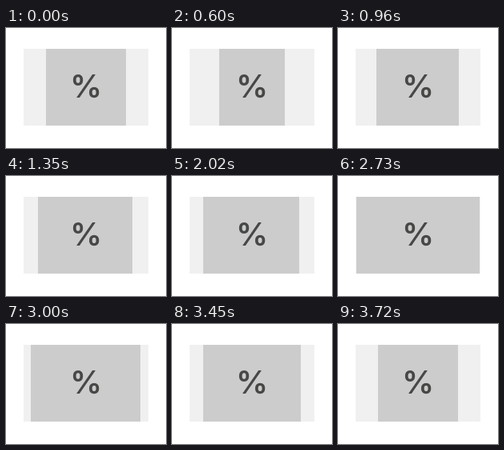
Write an HTML page that moves like this. It is 200 px wide and 150 px high and loops after 4750 ms.

```html
<!DOCTYPE html>
<html>
<head>
<meta charset="utf-8">
<style>
html, body { margin: 0; width: 100%; height: 100%; overflow: hidden; background: #fff; }
.track, .panel { position: absolute; top: 26px; height: 96px; }
.track { left: 22px; width: 156px; background: #f0f0f0; }
.panel { background: #ccc; }
.label {
  position: absolute; left: 50px; top: 26px; width: 100px;
  font: 600 40px/94px Inter, sans-serif; text-align: center; color: #464845;
}
</style>
</head>
<body>
<div class="track"></div>
<div class="panel"></div>
<div class="label">%</div>
<script>
const LOOP = 4750, TICK = 30;
const rest = { left: 50, right: 150 };
const drags = [
  { start: 300, end: 630, left: 60, right: 140 },
  { start: 630, end: 1350, left: 40, right: 158, power: 1.5 },
  { start: 1990, end: 2530, left: 22, right: 178 },
  { start: 2700, end: 3000, left: 31, right: 168 },
  { start: 3270, end: 3720, ...rest }
];
const panel = document.querySelector('.panel');

// How much of a drag is done; the picture moves in steps of one tick
function progress(time, { start, end, power = 1 }) {
  const elapsed = Math.floor((time - start) / TICK) * TICK;
  const t = Math.min(1, Math.max(0, elapsed / (end - start)));
  return 1 - (1 - t) ** power;
}

function draw() {
  const time = performance.now() % LOOP;
  let { left, right } = rest;
  for (const drag of drags) {
    const k = progress(time, drag);
    left += (drag.left - left) * k;
    right += (drag.right - right) * k;
  }
  left = Math.round(left);
  panel.style.left = left + 'px';
  panel.style.width = Math.round(right) - left + 'px';
  requestAnimationFrame(draw);
}
draw();
</script>
</body>
</html>
```
